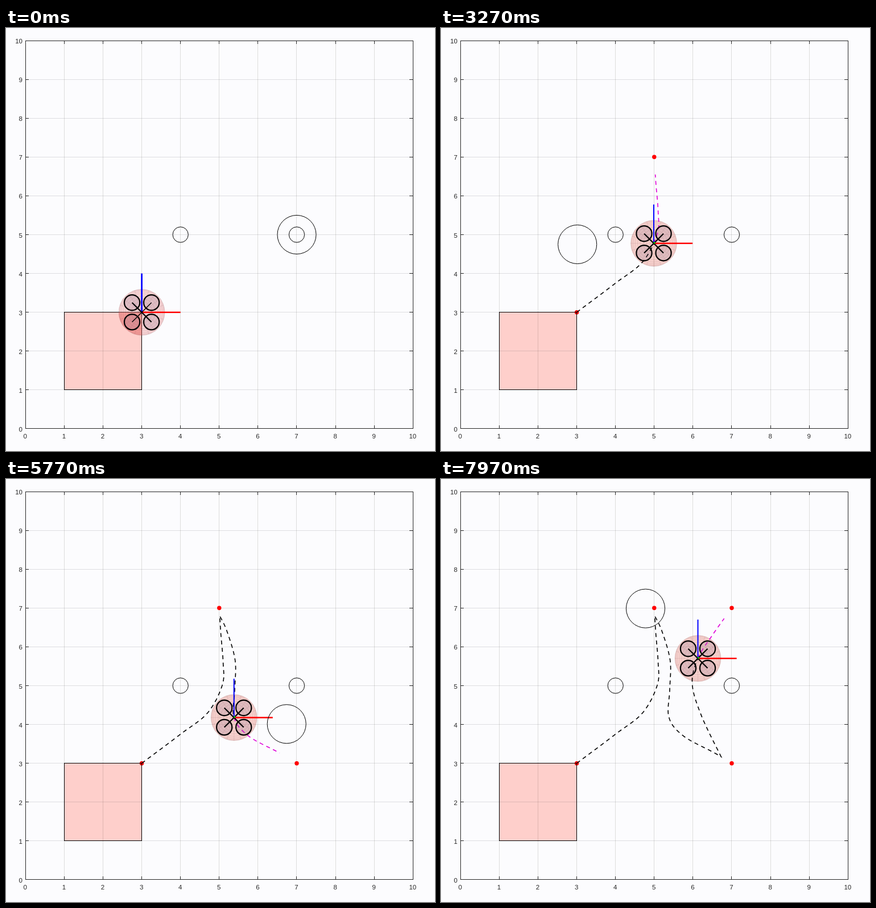
Write an HTML page with a canvas that moves like this. It is 754 px wide and 742 px high and loops after 8 s.

```html
<!DOCTYPE html>
<html lang="en">
<head>
<meta charset="utf-8">
<title>Drone path planning</title>
<style>
  html, body { margin: 0; width: 100%; height: 100%; overflow: hidden; background: #fcfcfe; }
  canvas { display: block; }
</style>
</head>
<body>
<canvas id="stage" width="754" height="742"></canvas>
<script>
const ctx = document.getElementById('stage').getContext('2d');
const LOOP = 8000, UNIT = 68.1, STEPS = 16, TAU = Math.PI * 2;
const BRAKE = 134;    // pixels before the goal where braking begins
const HORIZON = 0.9;  // seconds the planner looks ahead
const X = x => 34.3 + x * UNIT;
const Y = y => 703 - y * UNIT;
const crisp = v => Math.floor(v) + 0.5;

// Each leg is planned at `plan`, flown from `go` and starts where the last one stopped.
const legs = [
  { plan: 2.49, go: 2.5, speed: 240,
    via: [[3, 3], [4, 3.75], [4.7, 4.3], [5.08, 5.02], [5.1, 5.6], [5.04, 6.35], [5, 7]] },
  { plan: 4.62, go: 4.87, speed: 205,
    via: [[5.2, 6.4], [5.41, 5.65], [5.4, 4.9], [5.38, 4.18], [5.76, 3.7], [6.55, 3.27], [7, 3]] },
  { plan: 6.98, go: 7.15, speed: 230,
    via: [[6.22, 4.22], [5.98, 5.05], [6.13, 5.71], [6.5, 6.3], [7, 7]] }
];

function spline(a, b, c, d, u) {
  return 0.5 * (2 * b + (c - a) * u + (2 * a - 5 * b + 4 * c - d) * u * u
    + (3 * b - a - 3 * c + d) * u * u * u);
}

function buildLine(leg, from) {
  const p = leg.via.map(([x, y]) => [X(x), Y(y)]);
  leg.goal = p[p.length - 1];
  if (from) p.unshift(from);
  const last = p.length - 1;
  const at = i => p[Math.max(0, Math.min(last, i))];
  leg.line = [];
  leg.len = [];
  for (let i = 0; i <= last * STEPS; i++) {
    const k = Math.floor(i / STEPS), u = i / STEPS - k;
    const [x, y] = [0, 1].map(n => spline(at(k - 1)[n], at(k)[n], at(k + 1)[n], at(k + 2)[n], u));
    const before = leg.line[i - 1];
    leg.line.push([x, y]);
    leg.len.push(before ? leg.len[i - 1] + Math.hypot(x - before[0], y - before[1]) : 0);
  }
  leg.total = leg.len[leg.len.length - 1];
}

// Steady cruise, then an exponential approach to the goal.
function travelled(leg, t) {
  const cruise = leg.total - BRAKE;
  const d = leg.speed * Math.max(0, t - leg.go);
  return d < cruise ? d : leg.total - BRAKE * Math.exp((cruise - d) / BRAKE);
}

function pointAt(leg, d) {
  let i = 1;
  while (i < leg.len.length - 1 && leg.len[i] < d) i++;
  const u = (d - leg.len[i - 1]) / (leg.len[i] - leg.len[i - 1]);
  const a = leg.line[i - 1], b = leg.line[i];
  return [a[0] + (b[0] - a[0]) * u, a[1] + (b[1] - a[1]) * u];
}

legs.forEach((leg, i) => {
  const last = legs[i - 1], next = legs[i + 1];
  buildLine(leg, last && pointAt(last, last.end));
  leg.end = next ? travelled(leg, next.plan) : leg.total;
});

function trace(leg, from, to) {
  ctx.lineTo(...pointAt(leg, from));
  leg.line.forEach((p, i) => {
    if (leg.len[i] > from && leg.len[i] < to) ctx.lineTo(...p);
  });
  ctx.lineTo(...pointAt(leg, to));
}

function segment(x1, y1, x2, y2, color, width) {
  ctx.strokeStyle = color;
  ctx.lineWidth = width;
  ctx.beginPath();
  ctx.moveTo(x1, y1);
  ctx.lineTo(x2, y2);
  ctx.stroke();
}

function ring(x, y, r, color, width) {
  ctx.strokeStyle = color;
  ctx.lineWidth = width;
  ctx.beginPath();
  ctx.arc(x, y, r, 0, TAU);
  ctx.stroke();
}

function disc(x, y, r, color) {
  ctx.fillStyle = color;
  ctx.beginPath();
  ctx.arc(x, y, r, 0, TAU);
  ctx.fill();
}

const waypoint = (x, y) => disc(x, y, 3.7, '#f00');
const obstacle = (x, y, r) => ring(X(x), Y(y), r * UNIT, '#000', 1);

function drawBox(flying) {
  ctx.fillStyle = '#fecfcb';
  ctx.fillRect(X(1), Y(3), 2 * UNIT, 2 * UNIT);
  drawGrid();
  if (flying) waypoint(X(3), Y(3));
  ctx.strokeStyle = '#000';
  ctx.lineWidth = 1;
  ctx.strokeRect(crisp(X(1)), crisp(Y(3)), 136, 136);
}

function drawGrid() {
  for (let i = 1; i < 10; i++) {
    const x = crisp(X(i)), y = crisp(Y(i));
    segment(x, 22, x, 703, 'rgba(40,40,20,.14)', 1);
    segment(34, y, 715, y, 'rgba(40,40,50,.14)', 1);
  }
}

function drawAxes() {
  const ink = '#262626';
  ctx.strokeStyle = ink;
  ctx.lineWidth = 1;
  ctx.strokeRect(34.5, 22.5, 681, 680);
  ctx.font = '11.5px "Liberation Sans", Arial, sans-serif';
  ctx.fillStyle = ink;
  for (let i = 0; i <= 10; i++) {
    const x = crisp(X(i)), y = crisp(Y(i));
    if (i % 10) {
      segment(x, 22, x, 28, ink, 1);
      segment(x, 697, x, 703, ink, 1);
      segment(34, y, 40, y, ink, 1);
      segment(709, y, 715, y, ink, 1);
    }
    ctx.textAlign = 'center';
    ctx.fillText(i, X(i) - 0.5, 720);
    ctx.textAlign = 'right';
    ctx.fillText(i, 29, Y(i) + 5);
  }
}

function drawBall(x, y, flying) {
  const r = 40.5, mesh = 'rgba(100,50,60,.2)';
  disc(x, y, r, flying ? 'rgba(236,126,110,.34)' : 'rgba(235,120,115,.3)');
  if (!flying) {
    // The quarter that is sunk into the box is darker.
    ctx.save();
    ctx.beginPath();
    ctx.rect(X(1), Y(3), 2 * UNIT, 2 * UNIT);
    ctx.clip();
    disc(x, y, r, 'rgba(215,70,70,.24)');
    ctx.restore();
  }
  for (let i = 1; i <= 10; i++) ring(x, y, r * Math.sin(i * Math.PI / 20), mesh, 0.6);
  for (let i = 0; i < 20; i++) {
    const a = i * TAU / 20;
    segment(x, y, x + r * Math.cos(a), y + r * Math.sin(a), mesh, 0.6);
  }
}

function drawDrone(x, y, flying) {
  const arm = UNIT / 4, rotor = UNIT / 5;
  for (const sx of [-arm, arm]) {
    for (const sy of [-arm, arm]) {
      disc(x + sx, y + sy, rotor, 'rgba(130,100,130,.2)');
      ring(x + sx, y + sy, rotor, '#000', 2.2);
    }
  }
  segment(x, y, x + UNIT, y, '#f00', 2.5);
  segment(x, y, x, y - UNIT, '#00f', flying ? 2 : 2.7);
  segment(x - arm, y - arm, x + arm, y + arm, '#000', 2.2);
  segment(x - arm, y + arm, x + arm, y - arm, '#000', flying ? 2.2 : 1.4);
  if (flying) disc(x + 1, y - 1, 1.6, '#0c0');
}

function drawTrail(active, d, t) {
  const leg = legs[active];
  ctx.setLineDash([7, 6]);
  ctx.lineWidth = 1.6;
  ctx.strokeStyle = '#000';
  ctx.beginPath();
  for (let i = 0; i < active; i++) trace(legs[i], 0, legs[i].end);
  trace(leg, 0, d);
  ctx.stroke();
  ctx.strokeStyle = '#e000d8';
  ctx.beginPath();
  trace(leg, d, travelled(leg, t + HORIZON));
  ctx.stroke();
  ctx.setLineDash([]);
}

function draw(t) {
  ctx.fillStyle = '#fcfcfe';
  ctx.fillRect(0, 0, 754, 742);

  const planned = legs.filter(leg => t >= leg.plan);
  const flying = planned.length > 0;
  const leg = flying ? planned[planned.length - 1] : legs[0];
  const d = travelled(leg, t);
  const [x, y] = pointAt(leg, d);

  drawBox(flying);
  drawAxes();
  drawBall(x, y, flying);
  if (flying) drawTrail(planned.length - 1, d, t);
  drawDrone(x, y, flying);
  planned.forEach(p => waypoint(...p.goal));

  obstacle(4, 5, 0.2);
  obstacle(7, 5, 0.2);
  obstacle(5 + 2 * Math.cos(t), 5 + 2 * Math.sin(t), 0.5);
}

const begin = performance.now();

// Thirty pictures a second on a 10 ms clock: they last 30, 40 and 30 ms.
function tick() {
  const ms = (performance.now() - begin) % LOOP, part = ms % 100;
  draw((3 * Math.floor(ms / 100) + (part >= 30) + (part >= 70)) / 30);
  requestAnimationFrame(tick);
}
tick();
</script>
</body>
</html>
```
